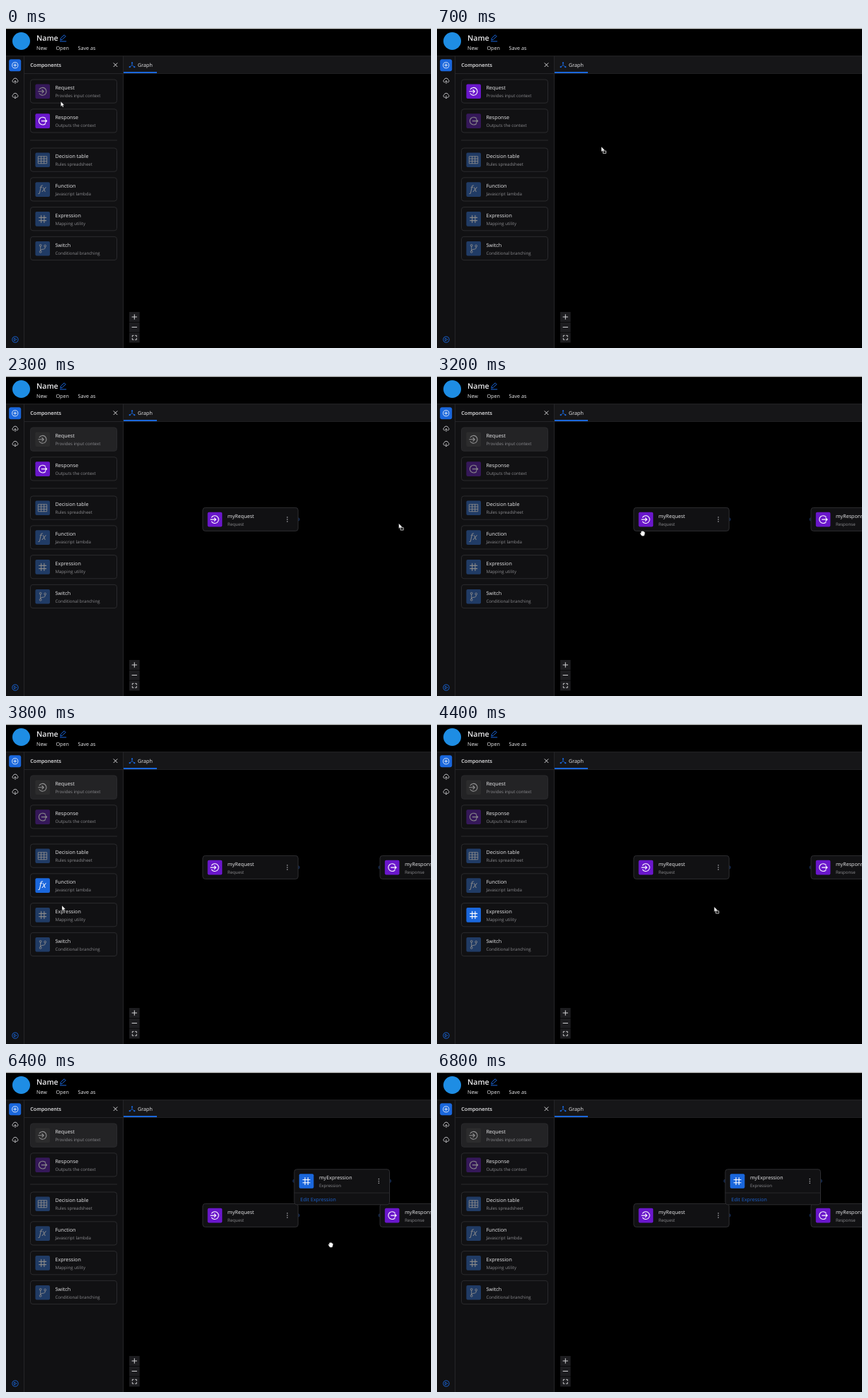
Write an HTML page that moves like this. It is 600x453 px and loops after 7000 ms.

```html
<!DOCTYPE html>
<html lang="en">
<head>
<meta charset="utf-8">
<title>Graph editor</title>
<style>
html, body { margin: 0; width: 100%; height: 100%; overflow: hidden; background: #000; }
svg { display: block; width: 100vw; height: 100vh; }
text { font-family: "Open Sans", "Noto Sans", sans-serif; font-size: 7.2px; fill: #ececee; text-rendering: geometricPrecision; }
.sub { font-size: 6.15px; fill: #8b8b8f; }
.bold { font-weight: 600; font-size: 7.1px; }
.line { fill: none; stroke-linecap: round; stroke-linejoin: round; }
</style>
</head>
<body>
<svg id="stage" viewBox="0 0 600 453"></svg>
<script>
const BLUE = '#1a67dc', PURPLE = '#6a17cb', BORDER = '#2a2a2d', PANEL = '#111113';
const stage = document.getElementById('stage');

const rect = (x, y, w, h, fill, more = '') =>
  `<rect x="${x}" y="${y}" width="${w}" height="${h}" fill="${fill}" ${more}/>`;
const text = (x, y, s, more = '') => `<text x="${x}" y="${y}" ${more}>${s}</text>`;
const line = (d, color, width = 0.9, more = '') =>
  `<path class="line" d="${d}" stroke="${color}" stroke-width="${width}" ${more}/>`;
const dot = (x, y, r, fill, more = '') => `<circle cx="${x}" cy="${y}" r="${r}" fill="${fill}" ${more}/>`;
const at = (x, y, body, more = '') => `<g transform="translate(${x} ${y})" ${more}>${body}</g>`;

// Glyphs are centred on 0,0
const glyph = {
  request: line('M-4.6-3A5.4 5.4 0 1 1-4.6 3M-6 0H1.6M-.8-2.3L1.6 0L-.8 2.3', '#fff', 1.1),
  response: line('M4-3.7A5.4 5.4 0 1 0 4 3.7M-1.5 0H6M3.7-2.2L6 0L3.7 2.2', '#fff', 1.1),
  table: line('M-6-5H6V5H-6ZM-6-1.7H6M-6 1.7H6M-2-5V5M2-5V5', '#fff', 0.9),
  fx: text(0, 3.8, 'fx', 'text-anchor="middle" style="font-size:12.5px;font-style:italic;fill:#fff"'),
  hash: line('M-2-5V5M2.2-5V5M-5-2H5M-5 2.2H5', '#fff', 1.1),
  branch: line('M-3-3V3M3.5-2.2V-1Q3.5.6 1.8.8L-1.6 1.4Q-3 1.8-3 3', '#fff') +
    [[-3, -4.4], [-3, 4.6], [3.5, -3.7]].map(([x, y]) =>
      dot(x, y, 1.4, 'none', 'stroke="#fff" stroke-width=".9"')).join('')
};
const badge = (name, color) => rect(-10.3, -10.3, 20.6, 20.6, color, 'rx="2"') + glyph[name];

const cards = [
  ['Request', 'Provides input context', 'request', PURPLE, 73],
  ['Response', 'Outputs the context', 'response', PURPLE, 114.8],
  ['Decision table', 'Rules spreadsheet', 'table', BLUE, 170],
  ['Function', 'Javascript lambda', 'fx', BLUE, 211.8],
  ['Expression', 'Mapping utility', 'hash', BLUE, 253.6],
  ['Switch', 'Conditional branching', 'branch', BLUE, 295.4]
];
const label = (title, sub) => text(34.9, 14.3, title) + text(34.9, 25.2, sub, 'class="sub"');
const card = ([title, sub, icon, color, y], i) => at(34.5, y,
  rect(0, 0, 122, 33.2, PANEL, `id="card${i}" rx="3.5" stroke="${BORDER}"`) +
  at(17.2, 16.8, badge(icon, color), `id="icon${i}"`) + label(title, sub));

function node(id, x, y, title, type, icon, color, ports, link) {
  const port = px => dot(px, 16.5, 2.2, '#0f2142', 'stroke="#1b3560" stroke-width=".6"');
  return at(x, y,
    ports.map(port).join('') +
    rect(0, 0, 134.5, link ? 50 : 33, PANEL, 'rx="3.5" stroke="#2d2d30"') +
    at(17.1, 16.7, badge(icon, color)) + label(title, type) +
    [13.7, 16.6, 19.5].map(cy => dot(119.3, cy, 0.75, '#c4c4c8')).join('') +
    (link ? line('M0 33.3H134.5', BORDER) +
      text(8.5, 45, link, 'style="font-size:7.1px;fill:#1c62cf"') : ''),
    `id="${id}"`);
}

const cloud = (y, arrow) => at(13, y,
  line('M-2 2.4H-2.4A1.9 1.9 0 0 1-2.9-1.2A3 3 0 0 1 2.9-1.2A1.9 1.9 0 0 1 2.4 2.4H2M0 .2V4' + arrow, '#c9c9cc', 0.9));

const header =
  rect(0, 0, 600, 40, '#000') + rect(0, 0, 600, 1.2, '#dfe1e1') +
  dot(21.5, 18.5, 12.5, '#1e8de4') +
  text(43, 18.3, 'Name', 'style="font-size:10.6px;font-weight:600"') +
  line('M76.4 18.9H84.8M76.9 16.7L77.4 14.3L82.2 9.8L84.2 11.8L79.4 16.2Z', BLUE, 1) +
  text(43, 31.2, 'New') + text(70.5, 31.2, 'Open') + text(101.5, 31.2, 'Save as');

const sidebar =
  rect(0, 40, 165.5, 413, PANEL) +
  line('M0 39.7H600M25.5 40V453M165.5 40V453M26 64.5H165', '#252528', 1) +
  rect(4.2, 44.2, 17, 17, BLUE, 'rx="3"') +
  dot(12.8, 52.7, 4.1, 'none', 'stroke="#fff" stroke-width=".8"') +
  line('M10.8 52.7H14.8M12.8 50.7V54.7', '#fff', 0.8) +
  cloud(74.5, 'M-1.4 1.6L0 .2L1.4 1.6') + cloud(95.7, 'M-1.4 2.6L0 4L1.4 2.6') +
  dot(13, 441, 4.1, 'none', `stroke="${BLUE}" stroke-width=".9"`) +
  line('M11.9 439.2L14.9 441L11.9 442.8Z', BLUE, 0.8) +
  text(34.3, 54.7, 'Components', 'class="bold"') +
  line('M152 49.7L157 54.7M157 49.7L152 54.7', '#d6d6d8', 1) +
  line('M34.5 159H156.5', BORDER, 1) +
  cards.map(card).join('');

const tabs =
  rect(166, 40, 434, 24.5, '#161618') + line('M166 64.5H600', '#252528', 0.8) +
  rect(166, 62, 47, 2, BLUE) +
  line('M178 49.5V52.5L175 55M178 52.5L181 55', BLUE, 0.9) +
  [[178, 49.3], [174.7, 55.2], [181.3, 55.2]].map(([x, y]) => dot(x, y, 1.15, BLUE)).join('') +
  text(186, 55.2, 'Graph');

const zoom =
  [402, 416.7, 431.4].map(y => rect(174, y, 14.6, 14, '#1d1d20')).join('') +
  line('M178 409H184.6M181.3 405.7V412.3M178 423.5H184.6', '#d0d0d3', 1) +
  line('M178.3 437V435.3H180M182.6 435.3H184.3V437M184.3 439.5V441.2H182.6M180 441.2H178.3V439.5', '#d0d0d3', 1);

const pointer =
  `<path id="arrow" d="M0 0V7.2L1.7 5.7L2.8 8.2L4 7.6L2.9 5.2H5.1Z" fill="#fff" stroke="#111" stroke-width=".35"/>` +
  `<path id="copy" d="M2.4 6H6.6V9.4H2.4Z" fill="#111" stroke="#ddd" stroke-width=".8"/>` +
  `<path id="hand" d="M-.2 3L.7 2.6L1.2 3.5V.7L2.2.5L2.6 1.2L3 0L4 .2L4.3 1L5 .6L5.7 1.2V1.9L6.4 1.8L6.9 2.5L6.2 5.7L5.4 7.3H2.3L.6 5Z" fill="#fff" stroke="#111" stroke-width=".3"/>`;

stage.innerHTML =
  rect(0, 0, 600, 453, '#000') +
  node('req', 277.8, 186.4, 'myRequest', 'Request', 'request', PURPLE, [134.5]) +
  node('res', 528, 186.4, 'myResponse', 'Response', 'response', PURPLE, [0, 134.5]) +
  node('exp', 407, 137.8, 'myExpression', 'Expression', 'hash', BLUE, [0, 134.5], 'Edit Expression') +
  header + tabs + sidebar + zoom + at(0, 0, pointer, 'id="cursor"');

const $ = id => document.getElementById(id);
const show = (id, on) => $(id).setAttribute('visibility', on ? 'visible' : 'hidden');
const clamp = v => Math.max(0, Math.min(1, v));

// time, x, y of the pointer tip
const path = [
  [0, 77.3, 104], [200, 78, 92], [300, 78, 92], [900, 309, 206], [1200, 309, 206],
  [1400, 258.5, 195.5], [1700, 73, 131], [1900, 73, 131], [2300, 554.5, 208.7], [2600, 560, 210],
  [2800, 560, 210], [3500, 82, 226], [3700, 80, 242], [3800, 79, 257], [3900, 78, 266],
  [4000, 78, 268], [4300, 300, 264], [4400, 391.3, 258.7], [5000, 423, 213],
  [5600, 444.7, 164], [6000, 440, 157], [6100, 440, 157], [6700, 470, 325], [7000, 470, 325]
];
const drags = [[300, 1200], [1900, 2800], [4000, 6100]];
// card index, start and end of its highlight
const hovers = [[0, 0, 1450], [1, -400, 200], [1, 1700, 3100], [3, 3450, 4000], [4, 3800, 6400]];

function pointerAt(t) {
  const i = path.findIndex((p, k) => k && t <= p[0]);
  const [t0, x0, y0] = path[i - 1], [t1, x1, y1] = path[i];
  const k = (t - t0) / (t1 - t0);
  return [x0 + (x1 - x0) * k, y0 + (y1 - y0) * k];
}

function draw(t) {
  const [x, y] = pointerAt(t);
  const dragging = drags.some(([a, b]) => t >= a && t < b);
  const visible = t < 6800;
  const grab = !dragging && x > 166;
  $('cursor').setAttribute('transform', `translate(${x} ${y})`);
  show('arrow', visible && !grab);
  show('copy', visible && dragging);
  show('hand', visible && grab);

  show('req', t >= 1200);
  show('res', t >= 2800);
  show('exp', t >= 6100);

  const used = clamp((t - 1400) / 300);
  cards.forEach((_, i) => {
    const lit = Math.max(0, ...hovers.filter(h => h[0] === i)
      .map(([, a, b]) => clamp((t - a) / 200) * clamp((b - t) / 200)));
    const icon = $('icon' + i);
    const gray = Math.max(0.3 * (1 - lit), i === 0 ? used : 0);
    icon.setAttribute('opacity', 0.5 + 0.5 * lit);
    icon.style.filter = gray ? `grayscale(${gray})` : 'none';
  });
  $('card0').setAttribute('fill', t < 1200 ? PANEL : used < 1 ? '#1b1b1d' : '#232325');
}

function tick() {
  draw(Math.floor(performance.now() % 7000 / 100) * 100);
  requestAnimationFrame(tick);
}
tick();
</script>
</body>
</html>
```
